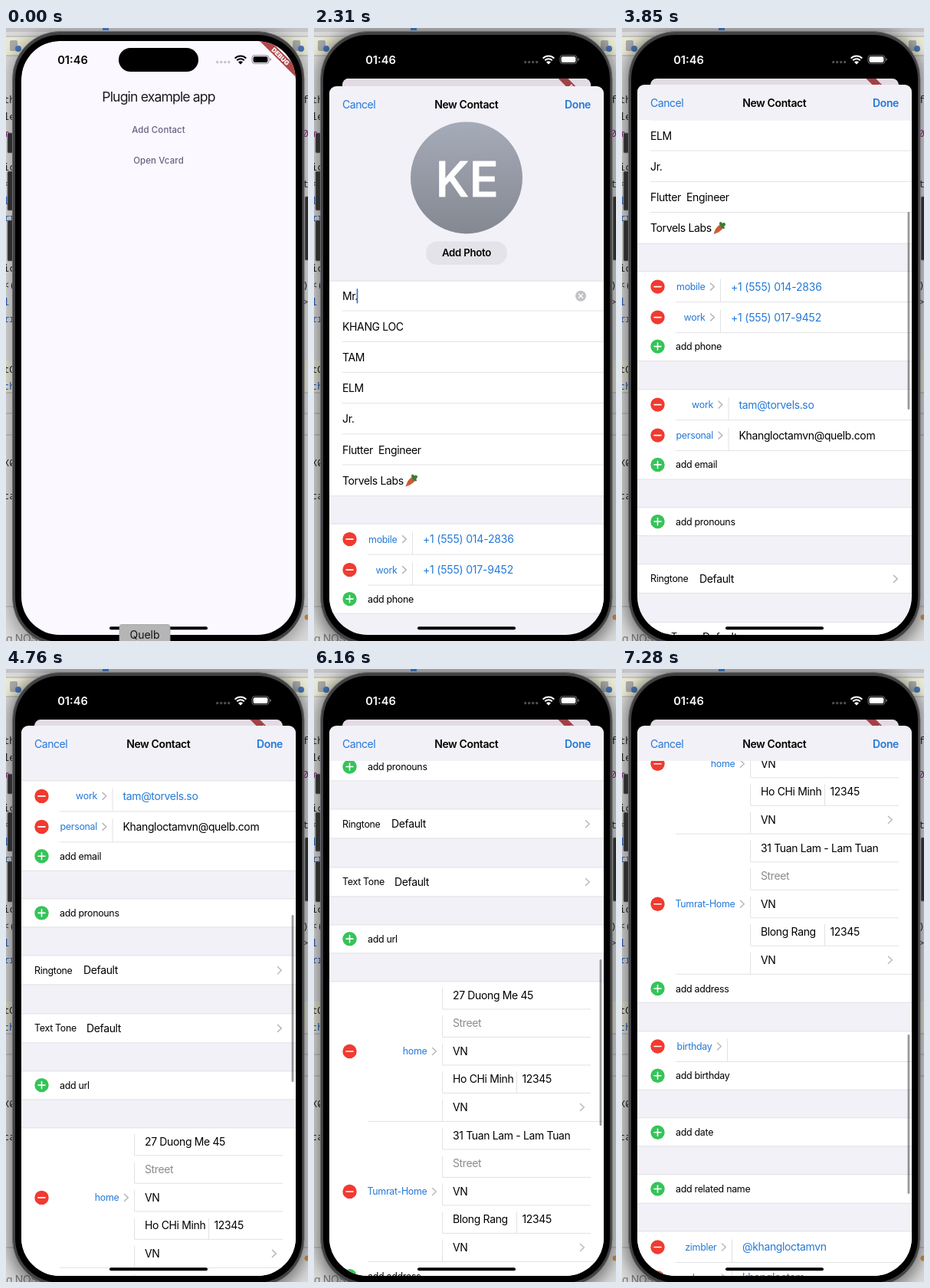
Recreate the animation shown at these times as an HTML page. Size 394 by 800 pixels, loop 8000 ms.

```html
<!DOCTYPE html>
<html lang="en">
<head>
<meta charset="utf-8">
<title>New contact</title>
<style>
html, body { margin: 0; width: 100%; height: 100%; overflow: hidden; background: #bbb; }
svg { display: block; width: 394px; height: 800px; font-family: Inter, "Open Sans", sans-serif; }
text { white-space: pre; }
.code { font: 13px "Noto Sans Mono", "DejaVu Sans Mono", monospace; }
</style>
</head>
<body>
<svg id="stage" viewBox="0 0 394 800" xmlns="http://www.w3.org/2000/svg"></svg>
<script>
const LOOP = 8000, STEP = 70;
const BLUE = '#2479d8', GRAY = '#f2f1f7', LINE = '#dfdee3';

// ---- drawing helpers ----
const rect = (x, y, w, h, fill, r = 0, more = '') =>
  `<rect x="${x}" y="${y}" width="${w}" height="${h}" rx="${r}" fill="${fill}" ${more}/>`;
const circle = (x, y, r, fill) => `<circle cx="${x}" cy="${y}" r="${r}" fill="${fill}"/>`;
const path = (d, stroke, w = 1, more = '') =>
  `<path d="${d}" fill="none" stroke="${stroke}" stroke-width="${w}" ${more}/>`;
// y is the middle of the capitals
const text = (x, y, s, { size = 14, fill = '#000', weight = 400, anchor = 'start', ls = -0.36, more = '' } = {}) =>
  `<text x="${x}" y="${y + size * 0.36}" font-size="${size}" fill="${fill}" font-weight="${weight}" ` +
  `text-anchor="${anchor}" letter-spacing="${ls}" ${more}>${s}</text>`;
const small = (x, y, s, opt = {}) => text(x, y, s, { size: 12.4, ls: -0.28, ...opt });
const hline = (x, y, end = 378) => path(`M${x} ${y}H${end}`, LINE, 0.9);
const vline = (x, y, end) => path(`M${x} ${y}V${end}`, LINE, 0.9);
const chevron = (x, y) =>
  path(`M${x} ${y - 4.5}l4.8 4.5l-4.8 4.5`, '#b9b9be', 1.5, 'stroke-linecap="round" stroke-linejoin="round"');

// ---- form rows, in scroll coordinates ----
const section = (top, end) => rect(20, top, 358, end - top, '#fff') + hline(20, top) + hline(20, end);
const badge = (y, plus) => circle(46.5, y, 9.2, plus ? '#35c458' : '#f13a30') +
  path(`M42 ${y}h9` + (plus ? `M46.5 ${y - 4.5}v9` : ''), '#fff', 1.6, 'stroke-linecap="round"');
const addRow = (y, label) => badge(y, true) + small(70, y, label);
const label = (y, s, vx) => badge(y) +
  small(vx - 20, y, s, { fill: BLUE, anchor: 'end' }) + chevron(vx - 13, y);
const entry = (y, s, vx, value, opt = {}) => label(y, s, vx) + vline(vx, y - 10, y + 20) +
  text(vx + 13.5, y, value, { fill: BLUE, ...opt }) + hline(70, y + 20);
const pick = (y, s, x) => small(37, y, s) + text(x, y, 'Default') + chevron(354.5, y);

function address(top, name, street, city) {
  const lines = [street, 'Street', 'VN', city, 'VN'];
  let out = label(top + 91, name, 167.5);
  lines.forEach((s, i) => {
    const y = top + 18 + 36.5 * i;
    out += text(181, y, s, { fill: s === 'Street' ? '#8c8c91' : '#000' }) + vline(167.5, y - 10, y + 18);
    if (i < 4) out += hline(168, y + 18, 361);
    if (i === 3) out += vline(264.5, y - 10, y + 18) + text(271.5, y, '12345');
  });
  return out + chevron(347.5, top + 164) + hline(70, top + 182.5);
}

const carrot = y => `<g transform="translate(127 ${y})">
  <path d="M-7.5 8Q-5 -1 0 -4Q4 -4 5 0Q2 5 -7.5 8Z" fill="#ce6038"/>
  <path d="M-3.5 1l2 2M0 -1.5l2 2.5" stroke="#9d3f22" fill="none" stroke-width=".8"/>
  <path d="M1 -3Q-1 -6 1 -8Q3 -8 4 -6Q6 -8 7.5 -6Q9 -4 6 -2Q8 0 6 1Q3 1 1 -3Z" fill="#3c7a35"/></g>`;

function form() {
  const names = ['Mr.', 'KHANG LOC', 'TAM', 'ELM', 'Jr.', 'Flutter  Engineer', 'Torvels Labs'];
  const tel = { ls: -0.2 };
  return circle(199, 193.3, 73, 'url(#avatar)') +
    text(200, 195, 'KE', { size: 63, weight: 500, fill: '#fff', anchor: 'middle', ls: 0.5,
      more: 'stroke="#fff" stroke-width="1.2" stroke-linejoin="round"' }) +
    rect(146, 276.3, 106, 30.5, '#e4e3e9', 15.2) +
    text(199, 291.5, 'Add Photo', { size: 13.2, weight: 600, anchor: 'middle', ls: -0.25 }) +
    section(328, 608.6) +
    names.map((s, i) => text(37, 347.5 + 40.2 * i, s) + (i ? hline(37, 326.7 + 40.2 * i) : '')).join('') +
    carrot(588.5) + rect(55.6, 338, 1.7, 19.5, '#3f6fc0', 0.8, 'id="caret"') +
    circle(348, 347.6, 7, '#c2c2c6') +
    path('M345.4 345l5.2 5.2m0-5.2l-5.2 5.2', '#fff', 1.3, 'stroke-linecap="round"') +
    section(645, 762) + entry(665, 'mobile', 128.5, '+1 (555) 014-2836', tel) +
    entry(705, 'work', 128.5, '+1 (555) 017-9452', tel) + addRow(743, 'add phone') +
    section(799, 916.5) + entry(819, 'work', 139, 'tam@torvels.so') +
    entry(859, 'personal', 139, 'Khangloctamvn@quelb.com', { fill: '#000' }) + addRow(897.3, 'add email') +
    section(953, 990) + addRow(971.5, 'add pronouns') +
    section(1027, 1065) + pick(1046.3, 'Ringtone', 101) +
    section(1103, 1141) + pick(1122, 'Text Tone', 105) +
    section(1178, 1215) + addRow(1196.2, 'add url') +
    section(1252, 1654.5) + address(1252, 'home', '27 Duong Me 45', 'Ho CHi Minh') +
    address(1435, 'Tumrat-Home', '31 Tuan Lam - Lam Tuan', 'Blong Rang') + addRow(1636.3, 'add address') +
    section(1692, 1768.5) + entry(1711.7, 'birthday', 137.5, '') + addRow(1750, 'add birthday') +
    section(1805, 1842) + addRow(1824, 'add date') +
    section(1879, 1916.5) + addRow(1897.7, 'add related name') +
    section(1953, 2072) + entry(1973.7, 'zimbler', 143.5, '@khangloctamvn') +
    entry(2013.7, 'vandroom', 143.5, 'khangloctam');
}

// ---- desk behind the phone ----
function desk() {
  const left = [[93, 'th'], [115, 'le'], [137, 'm', 1], [181, 'ic'], [203, '&lt;('], [225, 'l', 2], [247, 'rr', 2],
    [313, 'ic'], [335, '&lt;('], [357, 'l', 2], [379, 'rr', 2], [445, 'tO'], [467, 'ch', 2], [567, 'X0'], [610, 'ca']];
  const right = [[93, 'f'], [137, '0', 1], [203, 't'], [335, ')'], [357, '&gt;']];
  const inks = ['#222', '#8a1a86', '#1c55b8'];
  const code = x => ([y, s, ink = 0]) =>
    `<text class="code" x="${x}" y="${y + 5}" fill="${inks[ink]}">${s}</text>`;
  const file = x => rect(x, 16, 10, 14, '#a9abac', 2) + circle(x + 11, 27, 4, '#4b78b8');
  return rect(0, 0, 394, 800, '#d9d9d9') + rect(0, 0, 394, 5, '#c4c4c6') + rect(126, 0, 8, 3, '#3c7fd0') +
    rect(0, 11, 394, 25, '#e9e9d3') + rect(0, 434, 394, 42, '#e2e2d2') +
    [11, 36, 476, 503, 531, 755].map(y => path(`M0 ${y}H394`, '#a9a9a9')).join('') +
    file(5) + file(374) + left.map(code(-3.5)).join('') + right.map(code(387)).join('') +
    circle(393, 769, 3.5, '#d08b3c') + text(0, 797, 'g NOS', { fill: '#777', size: 14 }) +
    rect(4, 2, 389, 812, '#000', 64, 'id="shade" filter="url(#blur)"');
}

function phone() {
  const key = (x, y, h) => rect(x, y, 7, h, '#2d2d2e', 1.5, 'stroke="#777" stroke-width=".7"');
  return key(2, 137, 26) + key(2, 187, 51) + key(2, 251, 53) + key(390, 220, 83) +
    rect(8.5, 4.5, 380.5, 801, '#424244', 62, 'stroke="#6c6c6f"') +
    rect(12, 9, 374, 792, '#000', 58);
}

function app() {
  const btn = (y, s) => text(199, y, s, { size: 11.4, weight: 500, fill: '#65617f', anchor: 'middle', ls: 0.15 });
  return rect(20, 17, 358, 790, '#fcf8ff', 0, 'id="page"') +
    text(199, 90, 'Plugin example app', { size: 17.6, fill: '#1c1b1f', anchor: 'middle', ls: -0.85 }) +
    rect(153, 116, 92, 33, '#5d5791', 16.5, 'id="press"') +
    '<g clip-path="url(#pill)"><circle id="ripple" cx="199" cy="132.5" fill="#5d5791"/></g>' +
    btn(132.7, 'Add Contact') + btn(172.7, 'Open Vcard') +
    '<path d="M331 17H345L378 50V64Z" fill="#b0484a"/>' +
    `<g transform="translate(358 37) rotate(45)">${text(0, 0, 'DEBUG',
      { size: 8.3, weight: 900, fill: '#fff', anchor: 'middle', ls: 0 })}</g>` +
    rect(20, 17, 358, 790, '#3c1830', 0, 'id="dim"');
}

function status() {
  const arc = (r, w) => path(`M${306 - r * 0.72} ${47 - r * 0.72}A${r} ${r} 0 0 1 ${306 + r * 0.72} ${47 - r * 0.72}`,
    'currentColor', w);
  return rect(147, 26, 104, 31, '#000', 15.5) +
    `<g id="status">${text(87, 41.5, '01:46',
      { size: 14.6, weight: 600, fill: 'currentColor', anchor: 'middle', ls: 0 })}
    <path d="M306 47.5l-3-3.1a4.2 4.2 0 0 1 6 0Z" fill="currentColor"/>` + arc(6.6, 2) + arc(10.2, 2) +
    rect(321, 35.7, 22, 10.8, 'none', 3.4, 'stroke="currentColor" stroke-opacity=".45"') +
    rect(322.6, 37.3, 18.8, 7.6, 'currentColor', 2) +
    '<path d="M344.4 39.3v3.6q1.6-.6 1.6-1.8t-1.6-1.8Z" fill="currentColor" opacity=".5"/></g><g id="dots">' +
    [0, 1, 2, 3].map(i => circle(275.7 + 5 * i, 44.5, 1.7, 'currentColor')).join('') + '</g>';
}

const sheet = () => rect(20, 74, 358, 760, GRAY, 9) +
  `<g clip-path="url(#body)"><g id="form">${form()}</g></g>` +
  text(37, 98, 'Cancel', { fill: BLUE, ls: -0.45 }) +
  text(198.8, 98, 'New Contact', { weight: 600, anchor: 'middle', ls: -0.4 }) +
  text(361, 98, 'Done', { weight: 600, fill: BLUE, anchor: 'end', ls: -0.4 }) +
  rect(372.6, 0, 2.7, 200, '#000', 1.35, 'id="bar" fill-opacity=".4"');

document.getElementById('stage').innerHTML = `<defs>
  <linearGradient id="avatar" x2="0" y2="1"><stop stop-color="#a5abb8"/><stop offset="1" stop-color="#848891"/></linearGradient>
  <filter id="blur" x="-20%" y="-20%" width="140%" height="140%"><feGaussianBlur stdDeviation="9"/></filter>
  <clipPath id="screen">${rect(20, 17, 358, 775, '#000', 50)}</clipPath>
  <clipPath id="card">${rect(20, 17, 358, 790, '#000', 50, 'id="cardShape"')}</clipPath>
  <clipPath id="body">${rect(20, 120, 358, 720, '#000')}</clipPath>
  <clipPath id="pill">${rect(153, 116, 92, 33, '#000', 16.5)}</clipPath></defs>` +
  desk() + phone() +
  `<g clip-path="url(#screen)"><g id="app" clip-path="url(#card)">${app()}</g><g id="sheet">${sheet()}</g></g>` +
  status() + rect(135, 781.3, 128, 4, '#000', 2) +
  `<g id="tip">${rect(148, 778.5, 66, 30, '#b5b5b6', 3, 'stroke="#a2a2a3" stroke-width=".8"')}` +
  text(181, 792.3, 'Quelb', { fill: '#111', anchor: 'middle', ls: 0 }) + '</g>';

// ---- motion ----
const el = id => document.getElementById(id);
const set = (id, attrs) => { for (const k in attrs) el(id).setAttribute(k, attrs[k]); };
const clamp = x => Math.max(0, Math.min(1, x));
const ramp = (t, a, b) => clamp((t - a) / (b - a));
const mix = (a, b, p) => a + (b - a) * p;

// Finger drag, then exponential glide until caught
function flick(t, start, end, drag, glide) {
  const u = Math.min(t, end) - start, hold = 210;
  if (u <= 0) return 0;
  if (u < hold) return drag * Math.pow(u / hold, 1.4);
  return drag + glide * (1 - Math.exp(-(u - hold) / 500));
}
const scrollAt = t => flick(t, 3150, 4270, 90, 380) + flick(t, 4410, 6160, 179, 269) + flick(t, 6300, 7280, 90, 363);

function track(x, keys, col) {
  let i = 1;
  while (i < keys.length - 1 && x > keys[i][0]) i++;
  const a = keys[i - 1], b = keys[i];
  return mix(a[col], b[col], ramp(x, a[0], b[0]));
}
// scroll, bar top, bar length
const BAR = [[0, 126, 262], [327, 240, 258], [653, 321, 218], [844, 379, 217], [1219, 477, 208]];

function springLeft(t) {
  if (t >= 2450) return 0;
  const u = Math.max(0, t - 1870) * 0.01826;
  return (1 + u) * Math.exp(-u);
}

function draw(t) {
  const left = springLeft(t), p = 1 - left, y = scrollAt(t);
  set('tip', { opacity: 1 - ramp(t, 0, 420) });
  set('shade', { opacity: t < 1190 ? 0.26 : 0.42 });

  const fade = 1 - ramp(t, 1680, 1960);
  set('press', { opacity: 0.08 * ramp(t, 1260, 1400) * fade });
  set('ripple', { r: 10 + 42 * ramp(t, 1330, 1680), opacity: t < 1330 ? 0 : 0.1 * fade });

  const k = 1 - 0.095 * p;
  set('app', { transform: `translate(199 ${17 + 49 * p}) scale(${k}) translate(-199 -17)` });
  set('cardShape', { rx: mix(50, 9, p) });
  set('dim', { opacity: 0.13 * p });
  set('sheet', { transform: `translate(0 ${718 * left})`, visibility: t < 1890 ? 'hidden' : 'visible' });

  const ink = Math.round(255 * p), dot = Math.round(mix(196, 78, p));
  set('status', { color: `rgb(${ink},${ink},${ink})` });
  set('dots', { color: `rgb(${dot},${dot},${dot})` });

  set('caret', { opacity: 1 - ramp(t, 2520, 2730) + ramp(t, 2870, 3080) });
  set('form', { transform: `translate(0 ${-y})` });
  set('bar', { y: track(y, BAR, 1), height: track(y, BAR, 2), opacity: y > 0 ? 1 : 0 });
}

function tick() {
  const t = performance.now() % LOOP;
  draw(Math.floor(t / STEP) * STEP);
  requestAnimationFrame(tick);
}
tick();
</script>
</body>
</html>
```
